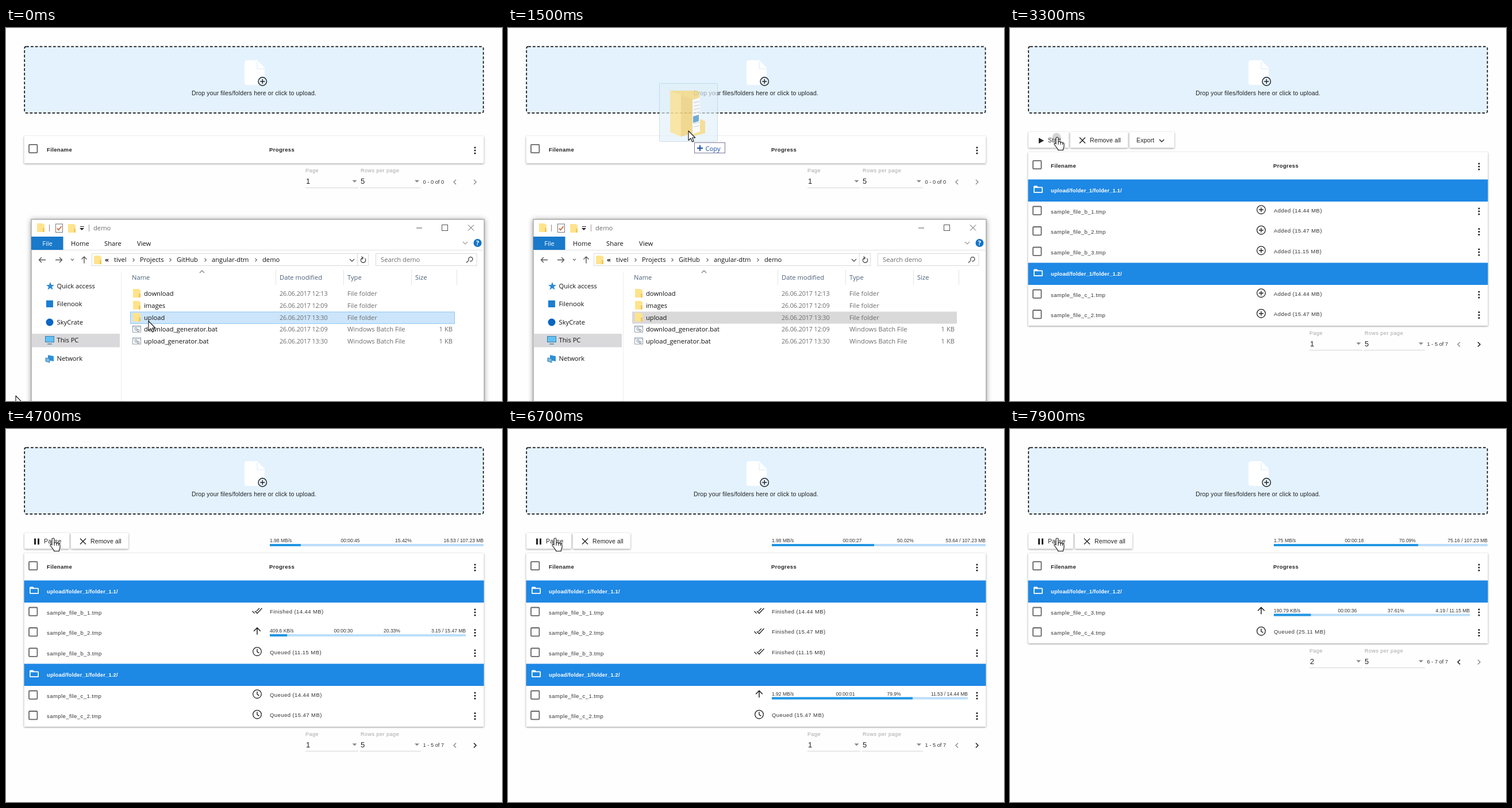
Recreate the animation shown at these times as an HTML page. Size 863 px wide and 649 px high, loop 8 s.

```html
<!DOCTYPE html>
<html lang="en">
<head>
<meta charset="utf-8">
<title>File upload demo</title>
<style>
html, body { margin: 0; width: 100%; height: 100%; overflow: hidden; background: #fefefe; }
svg { position: absolute; left: 0; top: 0; width: 863px; height: 649px; }
text { font-family: Arial, "Liberation Sans", sans-serif; font-size: 9.5px; fill: #333; white-space: pre; }
.zone { fill: #e3f2fd; stroke: #111; stroke-width: 1.7; stroke-dasharray: 4.7 3.1; }
.btn { font-size: 10.5px; letter-spacing: .13px; fill: #212121; }
.cell { letter-spacing: .43px; }
.head { font-weight: bold; letter-spacing: .36px; fill: #222; }
.group { font-size: 9.3px; font-weight: bold; letter-spacing: .2px; fill: #fff; }
.label { font-size: 9.1px; letter-spacing: .46px; fill: #a5a5a5; }
.value { font-size: 13px; fill: #222; }
.range { font-size: 9.3px; }
.stat { font-size: 8.5px; }
.win { font-family: "Open Sans", "Noto Sans", sans-serif; font-size: 11.2px; fill: #111; }
.grey { fill: #6d6d6d; }
.date { font-size: 10.8px; letter-spacing: -.13px; }
.col { fill: #4c607a; }
.bold { font-weight: bold; }
.mid { text-anchor: middle; }
.end { text-anchor: end; }
.card { fill: #fff; filter: drop-shadow(0 1px 1.4px rgba(0,0,0,.42)); }
.window { fill: #fff; stroke: #8a8a8a; filter: drop-shadow(0 1px 5px rgba(0,0,0,.4)); }
</style>
</head>
<body>
<svg viewBox="0 0 863 649">
  <g id="drop"></g>
  <g id="table"></g>
  <g id="explorer"></g>
  <g id="pointer"></g>
</svg>
<script>
const LOOP = 8000, STEP = 100;
const DROPPED = 2000, CLICKED = 3300, RUNNING = 3500, UPLOADING = 3800, NEXT_PAGE = 7700;
const FILES = [["b_1", 14.436], ["b_2", 15.47], ["b_3", 11.15],
  ["c_1", 14.436], ["c_2", 15.47], ["c_3", 11.15], ["c_4", 25.11]];
const TOTAL = 107.23;

// time, total MB, MB by file, total bar, file bar
const AMOUNT = [[3700, 0, 0, 0, 0], [4700, 16.53, 17.5815, 15.55, 15.8],
  [6700, 53.64, 52.59, 51.3, 51.43], [7900, 75.16, 75.156, 72.4, 73.07]];
// time, total MB/s, file MB/s
const SPEED = [[3700, .6, .6], [4500, 1.95, 1.9], [4700, 1.98, .4096], [5000, 1.98, 1.9],
  [6700, 1.98, 1.92], [7600, 1.8, 1.9], [7700, 1.77, .12], [7900, 1.75, .19079]];
const DRAG = [[1000, 248, 510], [1100, 251, 492], [1200, 268, 415], [1300, 290, 315],
  [1400, 305, 235], [1500, 314, 179], [1700, 321, 130], [1900, 325, 107]];
const HAND = [[2000, 325, 115], [2200, 325, 115], [2400, 277, 137], [2600, 190, 160],
  [2800, 118, 172], [2900, 96, 183], [3000, 82, 190]];

const $ = id => document.getElementById(id);

function at(keys, t) {
  if (t <= keys[0][0]) return keys[0].slice(1);
  const i = keys.findIndex(k => k[0] >= t);
  if (i < 0) return keys[keys.length - 1].slice(1);
  const a = keys[i - 1], b = keys[i], u = (t - a[0]) / (b[0] - a[0]);
  return a.slice(1).map((v, n) => v + (b[n + 1] - v) * u);
}

const text = (x, y, s, cls) => `<text x="${x}" y="${y}" class="${cls}">${s}</text>`;
const rect = (x, y, w, h, fill, more = "") =>
  `<rect x="${x}" y="${y}" width="${w}" height="${h}" fill="${fill}" ${more}/>`;
const card = (x, y, w, h) => `<rect class="card" x="${x}" y="${y}" width="${w}" height="${h}" rx="1.5"/>`;
const shape = (x, y, d, fill, more = "") =>
  `<path transform="translate(${x} ${y})" d="${d}" fill="${fill}" ${more}/>`;
const line = (x, y, d, color = "#222", w = 1.4) =>
  shape(x, y, d, "none", `stroke="${color}" stroke-width="${w}"`);
const dot = (x, y, r, fill, more = "") => `<circle cx="${x}" cy="${y}" r="${r}" fill="${fill}" ${more}/>`;
const ring = (x, y, r, w = 1.3) => dot(x, y, r, "none", `stroke="#222" stroke-width="${w}"`);

const CHEVRON = { down: "M-4-2L0 2 4-2", up: "M-4 2L0-2 4 2", left: "M2-4L-2 0 2 4", right: "M-2-4L2 0-2 4" };
const CROSS = "M-5-5L5 5M5-5L-5 5";
const PLUS = "M-4 0H4M0-4V4";
const ARROW = "M0 0V16.5L4 13 6.6 19 9.2 17.9 6.6 12H11.8Z";
const POINTING = "M-2 2Q-2 0 0 0T2 2V9Q2 7.5 4 7.5T6 9.5Q6 8.5 7.8 8.5T9.5 10.5Q10 9.5 11 9.8 12 10 12 12V16" +
  "Q12 18 10.5 20V22.5H1.5V21Q-.5 19-2 16.5L-5 12.5Q-5.5 10.5-4 10.3-3 10.3-2 12Z";

const checkbox = (x, y) => rect(x - 7.2, y - 7.2, 14.4, 14.4, "none", 'rx="1.2" stroke="#666" stroke-width="1.8"');
const dots = (x, y) => [-5, 0, 5].map(d => dot(x, y + d, 1.6, "#222")).join("");

const ICON = {
  added: (x, y) => ring(x, y, 7.3) + line(x, y, PLUS),
  queued: (x, y) => ring(x, y, 7.3) + line(x, y, "M0-4.5V.5L3.5 2.6"),
  active: (x, y) => line(x, y, "M0 6V-5.5M-5.8 0L0-5.8 5.8 0", "#222", 1.5),
  finished: (x, y) => line(x, y, "M-8.5 .5L-4.5 4.5M-4 .5L0 4.5 8.5-4.5M-1.5 1.2L4-4.5", "#222", 1.3)
};

const num = v => String(+v.toFixed(2));
const rate = v => v < 1 ? num(v * 1000) + " KB/s" : num(v) + " MB/s";
const pad = v => String(Math.floor(v)).padStart(2, "0");
const clock = s => `00:${pad(s / 60)}:${pad(s % 60)}`;

function progress(right, y, done, size, shown, speed, etaX, pctX) {
  const w = right - 459;
  return text(459, y - 3, rate(speed), "stat") +
    text(etaX, y - 3, clock((size - done) / speed), "stat mid") +
    text(pctX, y - 3, num(done / size * 100) + "%", "stat mid") +
    text(right, y - 3, `${num(done)} / ${num(size)} MB`, "stat end") +
    rect(459, y, w, 4, "#bbdefb") + rect(459, y, w * Math.max(0, shown) / size, 4, "#2196e3");
}

function toolbar(t) {
  const run = t >= RUNNING, dx = run ? 8 : 0;
  let s = card(32, 181, 70 + dx, 27.5) + card(105 + dx, 181, 100, 27.5);
  s += run ? rect(49, 190.5, 3, 10.5, "#222") + rect(55, 190.5, 3, 10.5, "#222")
    : shape(50, 191, "M0 0L9 5 0 10Z", "#222");
  s += text(66, 198.5, run ? "Pause" : "Start", "btn");
  s += line(126 + dx, 195.5, CROSS) + text(139 + dx, 198.5, "Remove all", "btn");
  if (!run) s += card(208, 181, 78, 27.5) + text(220, 198.5, "Export", "btn") + line(264, 196, CHEVRON.down);
  if (t >= CLICKED && t < RUNNING) s += dot(81, 190, t === CLICKED ? 7.5 : 12, "#000", 'opacity=".17"');
  return s;
}

function fileRow(i, y, t, a, speed) {
  const [name, size] = FILES[i];
  const base = FILES.slice(0, i).reduce((sum, f) => sum + f[1], 0);
  const done = a[1] - base;
  let state = "added";
  if (t >= RUNNING) state = "queued";
  if (t >= UPLOADING && done >= 0) state = done < size ? "active" : "finished";
  const word = state[0].toUpperCase() + state.slice(1);
  return checkbox(47.2, y + 15.7) + text(71, y + 20.7, `sample_file_${name}.tmp`, "cell") +
    ICON[state](437, y + 14.2) + dots(816, y + 17) +
    (state === "active" ? progress(800, y + 19.5, done, size, a[3] - base, speed[1], 587, 671.5)
      : text(459, y + 18.5, `${word} (${num(size)} MB)`, "cell"));
}

function pager(y, page, range, back, next) {
  const tri = "M-4-2H4L0 2Z", tone = on => on ? "#111" : "#888";
  return text(521, y + 15.5, "Page", "label") + text(617, y + 15.5, "Rows per page", "label") +
    text(522, y + 35.5, page, "value") + text(617, y + 35.5, "5", "value") +
    rect(521, y + 42, 92, 1, "#d4d4d4") + rect(616, y + 42, 106, 1, "#d4d4d4") +
    shape(606.5, y + 31.3, tri, "#888") + shape(715, y + 31.3, tri, "#888") +
    text(725.5, y + 35.3, range, "range") +
    line(781, y + 32.5, CHEVRON.left, tone(back)) + line(816, y + 32.5, CHEVRON.right, tone(next));
}

function table(t) {
  const count = t < DROPPED ? 0 : t < DROPPED + STEP ? 1 : 7;
  const page = t >= NEXT_PAGE ? 2 : 1;
  const from = page === 2 ? 5 : 0, to = page === 2 ? 7 : Math.min(5, count);
  const a = at(AMOUNT, t), speed = at(SPEED, t);
  const top = count ? 216 : 188;
  let y = top + 47.5, body = "", group = "";
  for (let i = from; i < to; i++) {
    const letter = FILES[i][0][0];
    if (letter !== group) {
      group = letter;
      body += rect(31.5, y, 800, 38.5, "#1e88e5") +
        shape(41, y + 11, "M1.5 0H6L8 2H14.5Q16 2 16 3.5V11Q16 12.5 14.5 12.5H1.5Q0 12.5 0 11V1.5Q0 0 1.5 0ZM1.7 3.7V10.8H14.3V3.7Z",
          "#fff", 'fill-rule="evenodd"') +
        text(71, y + 22.5, `upload/folder_1/folder_1.${letter === "b" ? 1 : 2}/`, "group");
      y += 38.5;
    }
    body += fileRow(i, y, t, a, speed);
    y += 35.5;
  }
  return (count ? toolbar(t) : "") +
    (t >= UPLOADING ? progress(831, 200, a[0], TOTAL, a[2], speed[0], 599, 691.5) : "") +
    card(31.5, top, 800, y - top) +
    checkbox(47.2, top + 22) + text(71, top + 27, "Filename", "head") +
    text(458, top + 27, "Progress", "head") + dots(816, top + 25) + body +
    pager(y, page, `${count ? from + 1 : 0} - ${to} of ${count}`, page === 2, count > 5 && page === 1);
}

const folder = (x, y) => shape(x, y, "M0 0H10L11 1.5H13V15H0Z", "#ffe38d") + shape(x, y, "M10 8H13V15H10Z", "#f0c95c");

function explorer(dragging) {
  const win = (x, y, s, cls = "") => text(x, y, s, "win " + cls);
  const thin = (x, y, d, c = "#666") => line(x, y, d, c, 1.2);
  let s = '<rect class="window" x="44" y="333" width="788" height="330"/>';
  s += folder(54, 340) + rect(75, 342, 1, 12, "#888") +
    rect(86.5, 341, 12, 14.5, "#fff", 'stroke="#777"') + line(92.5, 348.5, "M-3.5 0L-1 3 4-3.5", "#c8743a", 2) +
    folder(108, 341) + shape(132, 349, "M-4-1H4L0 3Z", "#222") + rect(129, 345, 7, 1, "#222") +
    rect(144, 342, 1, 12, "#999") + win(152, 352, "demo", "grey");
  s += rect(714, 347.5, 10, 1, "#555") + rect(758.5, 342.5, 10, 10, "none", 'stroke="#555"') + line(809, 347.5, CROSS, "#555", 1);
  s += rect(44, 363, 55.5, 23, "#1979ca") + '<text x="72" y="379" class="win mid" style="fill:#fff">File</text>' +
    win(113, 379, "Home") + win(171, 379, "Share") + win(228, 379, "View") +
    thin(799, 374, CHEVRON.down, "#999") + dot(820.5, 374, 7, "#1273c8") +
    '<text x="820.5" y="378" class="win mid bold" style="fill:#fff">?</text>' + rect(44, 386, 788, 1, "#e2e2e2");
  s += line(63, 403.5, "M6 0H-5M-1-4.5L-5.5 0-1 4.5", "#555") + line(92, 403.5, "M-6 0H5M1-4.5L5.5 0 1 4.5", "#555") +
    thin(115.5, 403, "M-2.5-1.3L0 1.3 2.5-1.3") + line(136, 403.5, "M0 6V-5M-4.5-1L0-5.5 4.5-1", "#555");
  s += rect(149.5, 392.5, 481, 21, "#fff", 'stroke="#d9d9d9"') + rect(611, 393, 1, 20, "#d9d9d9") +
    rect(643.5, 392.5, 175.5, 21, "#fff", 'stroke="#d9d9d9"') + folder(153, 396) + win(172, 406.5, "«", "bold");
  [[188, "tivel"], [233, "Projects"], [297, "GitHub"], [358, "angular-dtm"], [446, "demo"]].forEach(([x, name], i) => {
    s += win(x, 407, name) + (i ? thin(x - 11, 403.5, "M-1.5-2.8L1.3 0-1.5 2.8") : "");
  });
  s += line(602, 404, CHEVRON.down, "#555") + line(621.5, 404, "M3-3A4.2 4.2 0 1 1-1-4.1M-3-6.5L0-4-2.5-1.5", "#555") +
    win(652, 407, "Search demo", "grey") + line(807, 402.5, "M-1.6 1.6A3.6 3.6 0 1 1 .3 3M-1.6 1.6L-6 6", "#555");
  [[219, "Name"], [476, "Date modified"], [594, "Type"], [712, "Size"]].forEach(([x, name]) => s += win(x, 438, name, "col"));
  [469, 587, 705, 784].forEach(x => s += rect(x, 421, 1, 26, "#e3e3e3"));
  s += thin(341, 424, CHEVRON.up, "#777") + rect(200, 425, 1, 224, "#eee");

  s += rect(44.5, 532, 153.5, 23.5, "#d9d9dc");
  ["Quick access", "Filenook", "SkyCrate", "This PC", "Network"].forEach((name, i) => s += win(88.5, 452.6 + i * 31.5, name));
  s += shape(77, 449, "M0-7L2-2 7-2 3 1.3 4.5 6.5 0 3.5-4.5 6.5-3 1.3-7-2-2-2Z", "#2b8bd8") +
    rect(70, 474, 12, 12, "#1b7ed0") + dot(76, 512, 6.5, "#0a66c2") +
    rect(68.5, 536.5, 15, 10, "#63c1f3", 'stroke="#3a7fb0"') + rect(72, 549, 8, 1.5, "#5b7f97") +
    shape(69, 569, "M4 0L14 2V11L4 9Z", "#2f8fd8") + shape(69, 569, "M0 5L7 6V13L0 11Z", "#77bdea", 'stroke="#3c7da8"');

  s += dragging ? rect(216, 493.5, 565, 21, "#d9d9d9") : rect(216.5, 494, 564, 20.3, "#cce5fb", 'stroke="#8fc6f2"');
  [["download", "12:13"], ["images", "12:09"], ["upload", "13:30"],
    ["download_generator.bat", "12:09"], ["upload_generator.bat", "13:30"]].forEach(([name, time], i) => {
    const y = 462 + i * 20.75, bat = i > 2;
    s += bat ? rect(220.5, y - 6, 14, 11, "#fff", 'stroke="#8d9aa5"') + rect(221, y - 5.5, 13, 2, "#c3ced8") +
      dot(226, y - .5, 2, "none", 'stroke="#71818f"') + dot(230, y + 2, 1.8, "none", 'stroke="#71818f"') : folder(221, y - 8);
    s += win(240, y + 4.2, name) + win(476, y + 4.2, "26.06.2017 " + time, "grey date") +
      win(594, y + 4.2, bat ? "Windows Batch File" : "File folder", "grey") + (bat ? win(777, y + 4.2, "1 KB", "grey end") : "");
  });
  return s;
}

const cursor = (x, y, d) => shape(x, y, d, "#fff", 'stroke="#111" stroke-width="1.1" stroke-linejoin="round"');

function ghost(x, y) {
  let s = `<g transform="translate(${x - 51} ${y - 83})" opacity=".87">`;
  s += rect(.5, .5, 101, 101, "#e2f0fa", 'opacity=".75" stroke="#b3cbdc" rx="1"') +
    shape(0, 0, "M19 13H66L70 16V62L80 66V87L60 92Z", "#f4da88") +
    shape(0, 0, "M58 29L71 25V84L58 89Z", "#f8fafc");
  for (let i = 0; i < 8; i++) s += line(60, 34 + i * 6, "M0 0L10-2", "#b8c4cc", 1);
  s += shape(0, 0, "M59 58L69 55V66L59 69Z", "#5a9fd0") +
    shape(0, 0, "M19 13L38 20V93L19 85Z", "#f9e29a") + shape(0, 0, "M38 20L58 28V87L38 93Z", "#efd382");
  return s + "</g>";
}

function pointer(t) {
  if (t >= DROPPED) {
    const [x, y] = at(HAND, t);
    return cursor(x, y, POINTING) + line(x, y, "M2 9V13M6 9.5V13M9.5 10.5V13", "#111", 1);
  }
  const [x, y] = at(DRAG, t);
  let s = t < STEP ? cursor(17, 640, ARROW) : "";
  if (t > 1000) {
    s += ghost(x, y) + rect(x + 10.5, y + 20.5, 53, 18, "#fff", 'stroke="#7b7b9b"') +
      line(x + 20, y + 30, "M-5 0H5M0-5V5", "#1d4fa3", 2) +
      `<text x="${x + 29.5}" y="${y + 34.5}" class="win" style="fill:#1d4fa3">Copy</text>`;
  }
  return s + cursor(x, y, ARROW);
}

$("drop").innerHTML =
  '<rect class="zone" x="32.2" y="32.3" width="798.4" height="115.6" rx="3"/>' +
  shape(415, 56, "M4.5 0H22L35 13V39Q35 43 31 43H4Q0 43 0 39V4.5Q0 0 4.5 0Z", "#fff") +
  line(437, 59, "M0 0V12H12", "#e3f2fd", 1.6) +
  dot(446.3, 93, 9, "#e3f2fd") + ring(446.3, 93, 7.2, 1.4) + line(446.3, 93, PLUS) +
  text(323, 117, "Drop your files/folders here or click to upload.", "btn");

const begin = performance.now();
let last = -1, lastWindow;

function frame() {
  const t = Math.floor((performance.now() - begin) % LOOP / STEP) * STEP;
  if (t !== last) {
    last = t;
    $("table").innerHTML = table(t);
    const view = t >= DROPPED ? "" : explorer(t > 1000);
    if (view !== lastWindow) $("explorer").innerHTML = lastWindow = view;
    $("pointer").innerHTML = pointer(t);
  }
  requestAnimationFrame(frame);
}
frame();
</script>
</body>
</html>
```
